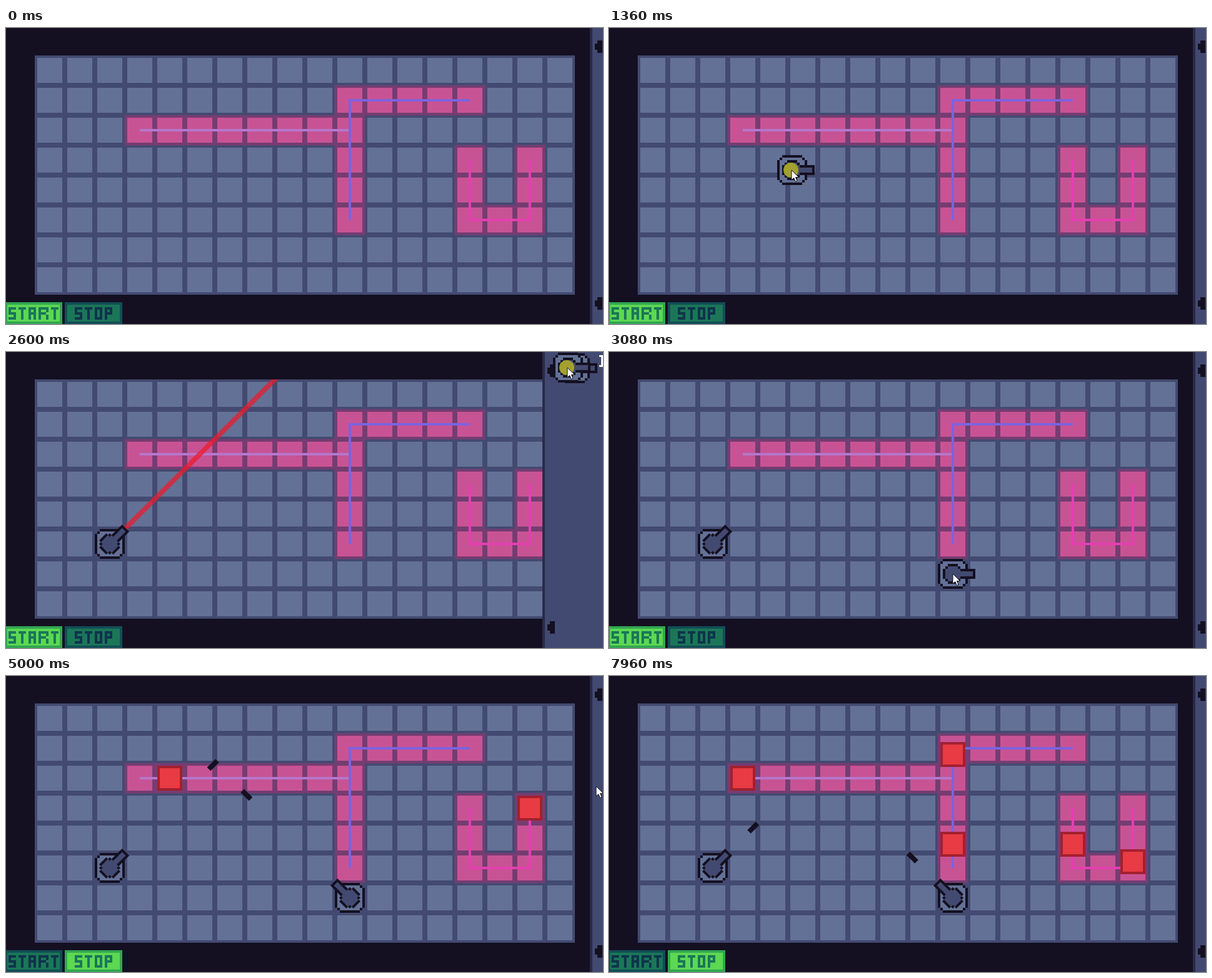
Recreate the animation shown at these times as an HTML page with a canvas. Size 955 by 475 pixels, loop 8 s.

```html
<!DOCTYPE html>
<html lang="en">
<head>
<meta charset="utf-8">
<title>Turret grid</title>
<style>
  html, body { margin: 0; width: 100%; height: 100%; overflow: hidden; background: #141021; }
  canvas { display: block; }
</style>
</head>
<body>
<canvas width="955" height="475" aria-label="Turret grid with START and STOP buttons"></canvas>
<script>
const ctx = document.querySelector('canvas').getContext('2d');
const INK = '#141021', BOARD = '#434a71', TILE = '#647196';
const LOOP = 8000, STEP = 40, CELL = 48;
const BX = 46, BY = 44, COLS = 18, ROWS = 8;

// Routes as corner cells [column, row]; enemies walk from the first corner.
const routes = [
  { corners: [[3, 2], [10, 2]], color: '#b676cc', first: 0 },
  { corners: [[10, 5], [10, 1], [14, 1]], color: '#7d62dd', first: 2 },
  { corners: [[16, 3], [16, 5], [14, 5], [14, 3]], color: '#e43fb0', first: 1 },
];
for (const r of routes) {
  r.cells = [r.corners[0]];
  for (const [cx, cy] of r.corners.slice(1)) {
    let [x, y] = r.cells.at(-1);
    while (x !== cx || y !== cy) {
      x += Math.sign(cx - x);
      y += Math.sign(cy - y);
      r.cells.push([x, y]);
    }
  }
}

const ticks = [4284, 4893, 5482, 6113, 6682, 7320, 7934];
const SPAWN_EVERY = 3, HIT = 144;

// dir counts eighths of a turn, clockwise from right.
const turrets = [
  { x: 166, y: 308, grab: 480, drop: 1720, turn: 1800, dir: 7, laserEnd: 3080 },
  { x: 550, y: 356, grab: 2580, drop: 3080, turn: 3100, dir: 5, laserEnd: 3600 },
];

const cursorKeys = [
  [120, 957, 70], [320, 920, 30], [440, 898, 25], [640, 898, 25], [920, 755, 90],
  [1360, 292, 228], [1560, 146, 300], [1720, 166, 308], [2160, 166, 308],
  [2520, 898, 25], [2620, 898, 25], [3000, 556, 350], [3080, 550, 356],
  [3340, 550, 356], [3440, 500, 380], [3600, 60, 456], [3680, 62, 458],
  [3800, 130, 482], [4180, 130, 482], [4200, 170, 470], [4720, 944, 177],
  [5040, 944, 177], [5520, 958, 230],
];
const panelKeys = [[160, 0], [320, 76], [760, 76], [920, 0], [2400, 0], [2560, 76], [2700, 76], [2860, 0]];

const glyphs = {
  S: ['###', '#..', '###', '..#', '###'],
  T: ['###', '.#.', '.#.', '.#.', '.#.'],
  A: ['###', '#.#', '###', '#.#', '#.#'],
  R: ['####', '#..#', '###.', '#..#', '#..#'],
  O: ['###', '#.#', '#.#', '#.#', '###'],
  P: ['###', '#.#', '###', '#..', '#..'],
};
const looks = { // fill, border, label
  bright: ['#5cd853', '#33a652', '#1b7658'],
  hover: ['#33a652', '#1b7658', '#134e56'],
  dim: ['#1b7658', '#134e56', '#0f344b'],
};

const between = (t, a, b) => t >= a && t < b;

function sample(keys, t) {
  let i = keys.findIndex(k => k[0] > t);
  if (i < 0) return keys.at(-1).slice(1);
  if (i === 0) return keys[0].slice(1);
  const a = keys[i - 1], b = keys[i];
  const u = (t - a[0]) / (b[0] - a[0]);
  return a.slice(1).map((v, j) => v + (b[j + 1] - v) * u);
}

function box(color, x, y, w, h) {
  ctx.fillStyle = color;
  ctx.fillRect(x, y, w, h);
}

const center = ([c, r]) => [BX + 24 + c * CELL, BY + 24 + r * CELL];

function placed(x, y, angle, draw) {
  ctx.save();
  ctx.translate(x, y);
  ctx.rotate(angle);
  draw();
  ctx.restore();
}

function drawBoard() {
  box(INK, 0, 0, 955, 475);
  box(BOARD, BX, BY, COLS * CELL, ROWS * CELL);
  for (let c = 0; c < COLS; c++)
    for (let r = 0; r < ROWS; r++) box(TILE, BX + 4 + c * CELL, BY + 4 + r * CELL, 40, 40);
  const cells = routes.flatMap(r => r.cells).map(center);
  for (const [x, y] of cells) box('rgba(116,60,112,.35)', x - 25, y - 25, 50, 50);
  for (const [x, y] of cells) box('#753d72', x - 24, y - 24, 48, 48);
  for (const [x, y] of cells) box('#c85394', x - 20, y - 20, 40, 40);
  ctx.lineWidth = 4;
  for (const r of routes) {
    ctx.strokeStyle = r.color;
    ctx.beginPath();
    r.corners.forEach(p => ctx.lineTo(...center(p)));
    ctx.stroke();
  }
}

// Pixel octagon with an open outline, centred on the origin.
function octagon(size, fill) {
  const h = size / 2;
  box(fill, -h + 4, -h + 4, size - 8, size - 8);
  for (let i = 0; i < 4; i++) {
    box(INK, -h + 8, -h, size - 16, 4);
    box(INK, -h + 4, -h + 4, 4, 4);
    ctx.rotate(Math.PI / 2);
  }
}

function drawTurret(x, y, dir) {
  placed(x, y, 0, () => octagon(48, TILE));
  placed(x, y, dir * Math.PI / 4, () => {
    octagon(32, BOARD);
    box(INK, 12, -8, 24, 16);
    box(BOARD, 10, -4, 22, 8);
  });
}

function drawEnemies(t, now, shot) {
  for (const r of routes) {
    for (let s = r.first; s <= now; s += SPAWN_EVERY) {
      const age = now - s;
      if (r === routes[0] && (age > 2 || (age === 2 && shot > HIT))) continue;
      const [x1, y1] = center(r.cells[age]);
      const [x0, y0] = center(r.cells[Math.max(0, age - 1)]);
      const u = Math.min(1, (t - ticks[now]) / 33);
      const x = Math.round(x0 + (x1 - x0) * u), y = Math.round(y0 + (y1 - y0) * u);
      box('#a3202f', x - 20, y - 20, 40, 40);
      box('#e83b43', x - 16, y - 16, 32, 32);
    }
  }
}

function drawBullets(now, shot) {
  if (shot > 285) return;
  turrets.forEach((g, i) => {
    const spent = i === 0 && now >= 2 && (now - 2) % SPAWN_EVERY === 0 && shot > HIT;
    if (spent) return;
    const sx = g.dir === 7 ? 1 : -1;
    placed(g.x + sx * shot, g.y - shot, g.dir * Math.PI / 4, () => box(INK, -9.5, -4, 19, 8));
  });
}

function drawPanel(open) {
  const x = 934 - open;
  box('#2b2a49', x, 0, 4, 475);
  box(BOARD, x + 4, 0, 955 - x, 475);
  for (const y of [20, 432]) {
    box(INK, x + 12, y, 8, 20);
    box(INK, x + 8, y + 5, 4, 10);
  }
  drawTurret(x + 52, 26, 0);
  box('#fff', x + 91, 5, 8, 3);
  box('#fff', x + 94, 5, 4, 19);
  box('#fff', x + 91, 21, 10, 3);
}

function drawButton(x, label, left, look) {
  const [fill, border, ink] = looks[look];
  box(border, x, 440, 92, 35);
  box(fill, x + 4, 444, 84, 27);
  for (const ch of label) {
    const rows = glyphs[ch];
    rows.forEach((row, j) => [...row].forEach((p, i) => {
      if (p === '#') box(ink, left + i * 4, 448 + j * 4, 4, 4);
    }));
    left += rows[0].length * 4 + 4;
  }
}

function drawCursor(x, y, pressed) {
  if (pressed) {
    ctx.fillStyle = 'rgba(176,172,38,.88)';
    ctx.beginPath();
    ctx.arc(x - 1, y, 12, 0, 7);
    ctx.fill();
  }
  placed(x, y, 0, () => {
    ctx.beginPath();
    for (const p of [[0, 0], [0, 16], [3.7, 12.6], [6.4, 18.5], [9, 17.3], [6.5, 11.6], [11.5, 11.3]])
      ctx.lineTo(...p);
    ctx.closePath();
    ctx.fillStyle = '#fff';
    ctx.fill();
    ctx.strokeStyle = INK;
    ctx.lineWidth = 1;
    ctx.stroke();
  });
}

function render(t) {
  const [cx, cy] = sample(cursorKeys, t);
  const now = ticks.findLastIndex(k => k <= t);
  const shot = 32.5 + 1.24 * (t - ticks[now]);
  drawBoard();

  ctx.save();
  ctx.beginPath();
  ctx.rect(BX, BY, COLS * CELL, ROWS * CELL);
  ctx.clip();
  if (now >= 0) {
    drawEnemies(t, now, shot);
    drawBullets(now, shot);
  }
  for (const g of turrets) {
    g.now = Math.min(g.dir, Math.max(0, Math.floor((t - g.turn) / 45)));
    if (between(t, g.turn, g.laserEnd))
      placed(g.x, g.y, g.now * Math.PI / 4, () => box('rgba(238,26,42,.72)', 36, -4, 1000, 8));
  }
  ctx.restore();

  for (const g of turrets) if (t >= g.drop) drawTurret(g.x, g.y, g.now);
  drawPanel(sample(panelKeys, t)[0]);

  const started = t >= 3680;
  drawButton(-2, 'START', 4, started ? 'dim' : between(t, 3560, 3680) ? 'hover' : 'bright');
  drawButton(94, 'STOP', 110, !started ? 'dim' : t < 4200 ? 'hover' : 'bright');

  const held = turrets.some(g => between(t, g.grab, g.drop));
  if (held) drawTurret(cx + 1, cy, 0);
  drawCursor(cx, cy, held || between(t, 3620, 3720));
}

function loop() {
  const t = performance.now() % LOOP;
  render(Math.floor(t / STEP) * STEP);
  requestAnimationFrame(loop);
}
loop();
</script>
</body>
</html>
```
